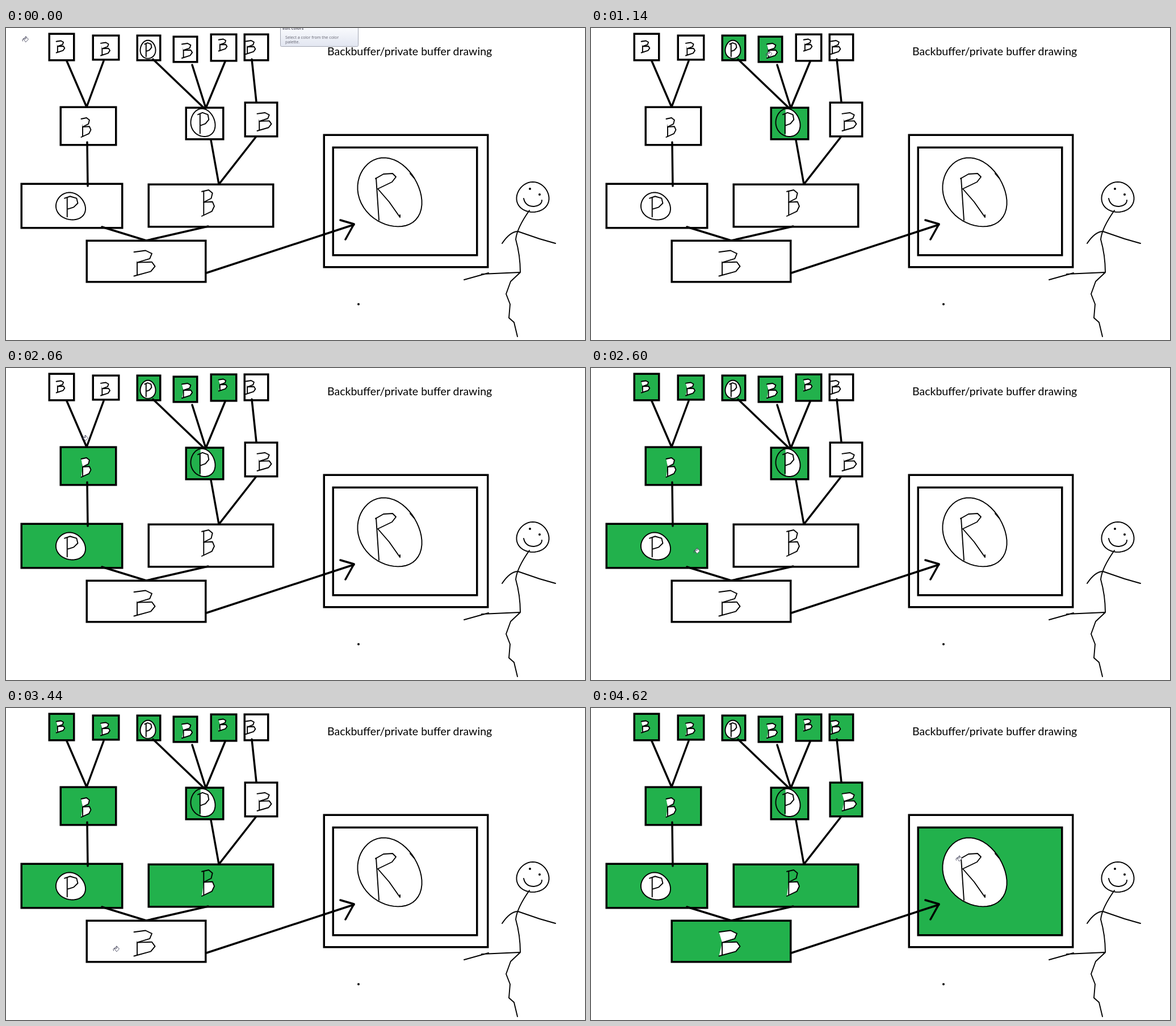
An HTML page that plays this animation: 1020x549 px, repeating every 4.72 s.

```html
<!DOCTYPE html>
<html>
<head>
<meta charset="utf-8">
<style>
html, body { margin: 0; width: 100%; height: 100%; overflow: hidden; background: #fff; }
svg { display: block; }
path, .box { fill: none; stroke: #000; stroke-linecap: round; stroke-linejoin: round; }
.box, .line { stroke-width: 3.5; stroke-linejoin: miter; }
.line { stroke-linejoin: round; }
.ink { stroke-width: 1.9; }
.blank { fill: #fff; }
.bare { stroke: none; }
.title { font: 19.52px Lato, Carlito, sans-serif; }
.tip text { font: 7.2px "Open Sans", sans-serif; fill: #62626f; }
</style>
</head>
<body>
<svg width="1020" height="549" viewBox="0 0 1020 549">
  <defs>
    <linearGradient id="sheen" x2="0" y2="1">
      <stop offset="0.2" stop-color="#fbfcfe"/>
      <stop offset="1" stop-color="#e2e6f1"/>
    </linearGradient>
  </defs>
  <g id="fills" fill="#22b14c"></g>
  <g id="art"></g>
  <path class="line" d="M107 58L142 139L172 58M259 55L349 141M328 65L352 141L386 59M433 55L441 130
    M143 201L144 278M361 197L375 275L440 192M169 350L247 374L356 349M353 431L613 346M589 338L613 345L598 372"/>
  <path class="ink" d="M652 264L657 338M651 265L665 257L681 256L687 262L680 271L655 283L675 306L694 333V329M712 256L719 264"/>
  <path class="ink" d="M912 300Q915 314 930 314Q944 312 944 303
    M922 321Q900 352 898 372Q906 400 906 430L889 446L881 468L888 486L886 510L895 518L901 543
    M874 379Q888 358 902 358L940 371L968 379M807 443L850 431M838 433L905 430"/>
  <g>
    <circle cx="923" cy="283" r="2"/>
    <circle cx="940" cy="293" r="2"/>
    <circle cx="621" cy="486" r="2"/>
  </g>
  <text class="title" x="566" y="48">Backbuffer/private buffer drawing</text>
  <g id="tip" class="tip">
    <rect x="483.5" y="-12" width="137" height="44.5" rx="2" fill="url(#sheen)" stroke="#a3a7b3"/>
    <text x="487" y="3" style="font-weight:700">Edit colors</text>
    <text x="492" y="18.5">Select a color from the color</text>
    <text x="492" y="27">palette.</text>
  </g>
  <g id="cursor">
    <path d="M-3 -1L1 -5L5.5 0L1 4.5Z" style="fill:#fff;stroke:#55556a"/>
    <path d="M-3 -1H1V-5M-3 -1Q-6 -1 -4.5 3" style="stroke:#44445a"/>
  </g>
</svg>
<script>
const LOOP = 4720, STEP = 20;
const $ = id => document.getElementById(id);
const nodes = [];

function add(parent, tag, attrs) {
  const el = document.createElementNS('http://www.w3.org/2000/svg', tag);
  for (const k in attrs) el.setAttribute(k, attrs[k]);
  return $(parent).appendChild(el);
}

const path = (cls, d) => add('art', 'path', { class: cls, d });

// The line is widened outwards, the inside keeps its size
const frame = (x, y, w, h) =>
  add('art', 'rect', { class: 'box', x: x + 1.25, y: y + 1.25, width: w - 2.5, height: h - 2.5 });

// Places a letter drawn in a unit square: strokes split by |
function scaled(strokes, cx, cy, w, h) {
  return strokes.split('|').map(s => 'M' + s.split(' ').map(p => {
    const [x, y] = p.split(',');
    return [cx + (x - 0.5) * w, cy + (y - 0.5) * h];
  }).join('L'));
}

function letterB(cx, cy, h, w = h * 0.7, leaky = false) {
  const [stem, upper, lower] = scaled(
    '.15,.05 .15,.97|0,.06 .55,0 .85,.12 .75,.32 .15,.47|.15,.47 .85,.45 1,.62 .8,.82 0,1', cx, cy, w, h);
  path('ink blank', stem + lower);
  path(leaky ? 'ink' : 'ink blank', upper);
}

// Wobbly oval; the skew leans it
function oval(cx, cy, w, h, skew, reach) {
  const pts = [];
  for (let a = -reach; a <= reach; a += reach / 24) {
    const r = 0.5 + 0.012 * Math.sin(3 * a);
    pts.push([cx + w * r * Math.cos(a), cy + h * r * Math.sin(a + skew)]);
  }
  return 'M' + pts.join('L');
}

// White runs only as far round as the stroke holds the paint out
function ring(cx, cy, h, w = h, skew = 0, reach = Math.PI) {
  path('bare blank', oval(cx, cy, w, h, skew, reach));
  path('ink', oval(cx, cy, w, h, skew, Math.PI));
}

function letterP(cx, cy, h, w, skew, reach) {
  ring(cx, cy, h, w, skew, reach);
  path('ink', scaled('.38,.18 .38,.88|.29,.2 .48,.13 .7,.2 .74,.38 .6,.53 .38,.6', cx, cy, w, h).join(''));
}

function node(x, y, w, h, time, letter, ...place) {
  const fill = add('fills', 'rect', { x: x + 1, y: y + 1, width: w - 2, height: h - 2 });
  frame(x, y, w, h);
  letter(...place);
  nodes.push({ fill, time, stop: [time, x + w * 0.25, y + h * 0.68] });
}

node(230, 12, 43, 46, 240, letterP, 250, 38, 32, 27);
node(316, 139, 68, 58, 720, letterP, 347, 167, 49, 43, 0.1, 1.77);
node(294, 14, 44, 47, 1100, letterB, 319, 40, 26);
node(360, 10, 47, 49, 1280, letterB, 382, 30, 21);
node(26, 273, 180, 80, 1760, letterP, 114, 314, 48, 52, 0.1);
node(95, 138, 100, 69, 1960, letterB, 141, 175, 34, 17);
node(152, 12, 48, 45, 2180, letterB, 175, 37, 23);
node(75, 9, 46, 49, 2320, letterB, 96, 33, 21);
node(250, 274, 222, 77, 3340, letterB, 356, 308, 46, 22, true);
node(141, 373, 212, 75, 3440, letterB, 244, 414, 45, 37);
node(575, 209, 256, 192, 3600, ring, 676, 290, 121, 113, 0.22);
node(420, 130, 59, 62, 4100, letterB, 455, 165, 32, 25);
node(419, 10, 44, 48, 4340, letterB, 431, 34, 24);
frame(559, 187, 291, 235);
ring(928, 298, 53, 57);

// The bucket calls at each box as it is filled, with a few detours: time, x, y
const detours = `0,34,20 540,29,139 1520,464,50 1620,130,112 2600,186,322 2680,326,326 2800,77,300
  3060,583,380 3160,478,397 3720,142,255 3780,217,222 3900,166,190 4440,341,120
  4540,949,282 4620,648,265 ${LOOP},648,265`;
const stops = detours.split(/\s+/).map(s => s.split(',').map(Number))
  .concat(nodes.map(n => n.stop))
  .sort((a, b) => a[0] - b[0]);

function draw(now) {
  const t = Math.floor(now % LOOP / STEP) * STEP;
  for (const n of nodes) n.fill.style.display = t > n.time ? '' : 'none';
  $('tip').style.display = t < 100 ? '' : 'none';
  const i = stops.findIndex(s => s[0] > t);
  const a = stops[i - 1], b = stops[i];
  const u = (t - a[0]) / (b[0] - a[0]), e = u * u * (3 - 2 * u);
  const [x, y] = [1, 2].map(k => a[k] + (b[k] - a[k]) * e);
  $('cursor').setAttribute('transform', `translate(${x} ${y})`);
}

const start = performance.now();
function tick() {
  draw(performance.now() - start);
  requestAnimationFrame(tick);
}
tick();
</script>
</body>
</html>
```
